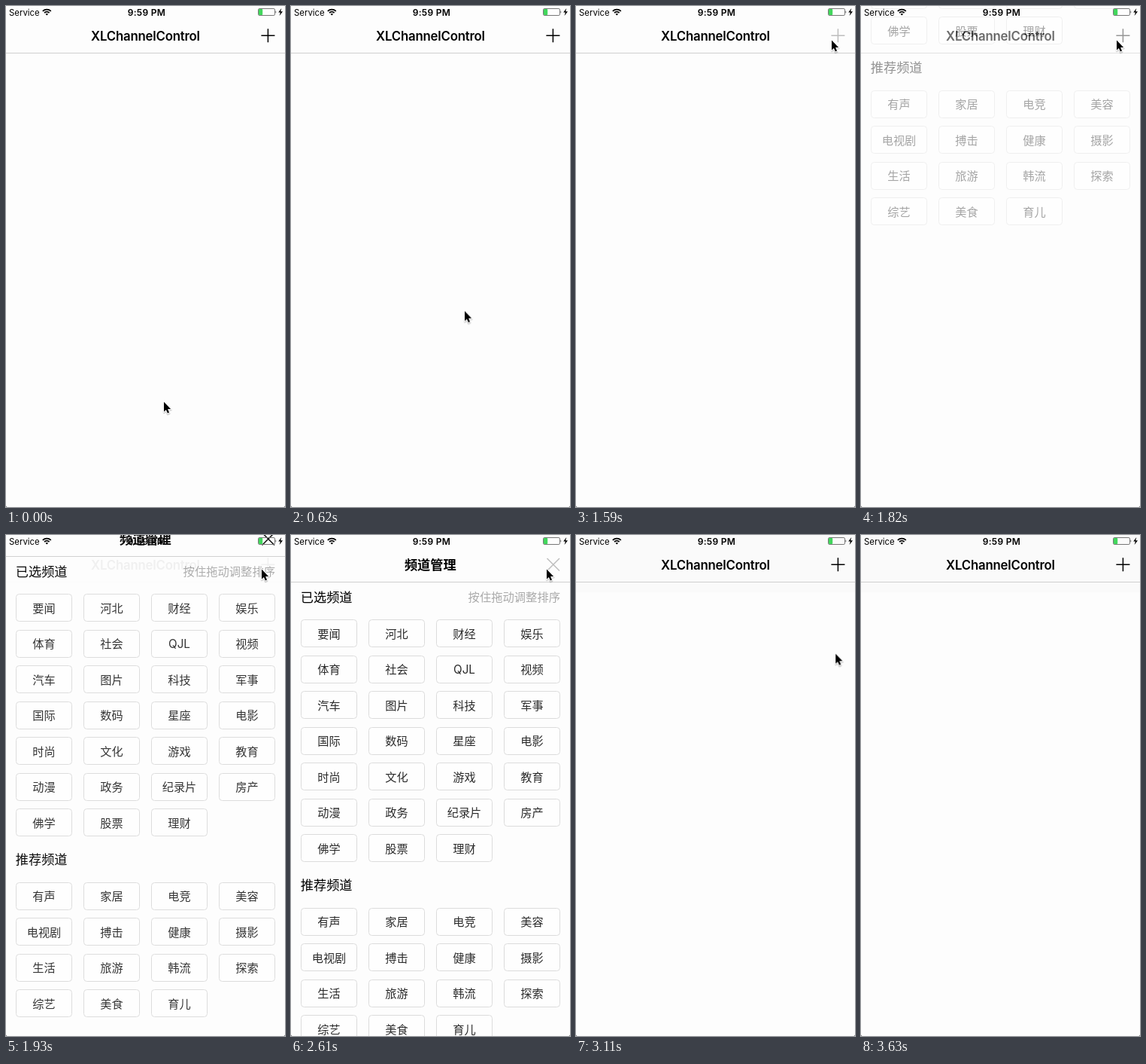
An HTML page that plays this animation: 371 by 665 pixels, repeating every 4680 ms.

```html
<!DOCTYPE html>
<html lang="zh-CN">
<head>
<meta charset="utf-8">
<title>Channel control</title>
<style>
  html, body { margin: 0; width: 100%; height: 100%; overflow: hidden; background: #fdfdfd; }
  svg { display: block; width: 100vw; height: 100vh; }
  text { font-family: Inter, "Noto Sans CJK SC", "Noto Sans CJK", sans-serif; }
  .title { font-size: 16.8px; font-weight: 600; text-anchor: middle; }
  .latin { letter-spacing: -.2px; }
  .zh { font-size: 17.2px; font-family: "Noto Sans CJK SC", "Noto Sans CJK", sans-serif; }
  .zh.title { font-weight: 700; }
  .hint { font-size: 15.3px; fill: #aaa; text-anchor: end; }
  .tag text { font-size: 15.2px; fill: #2b2b2b; text-anchor: middle; }
  .tag rect { fill: #fefefe; stroke: #dcdcdc; }
  .icon { fill: none; stroke: #000; stroke-width: 1.5; }
  .rule { stroke: #cfcfcf; }

  #sheet, #plus, #close, #tint, #cursor { animation: 4680ms linear infinite; }
  #sheet, #plus, #close, #tint { animation-timing-function: step-end; }
  #sheet { animation-name: sheet; }
  #plus { animation-name: plus; }
  #close { animation-name: close; }
  #tint { animation-name: tint; }
  #cursor { animation-name: cursor; }

  /* Fades in while dropping from the top, leaves opaque. */
  @keyframes sheet {
    0%, 62.6%, 100% { transform: translateY(-670px); opacity: 0; }
    36.53% { transform: translateY(-650px); opacity: .02; }
    37.6%  { transform: translateY(-559px); opacity: .16; }
    38.88% { transform: translateY(-383px); opacity: .42; }
    40.17% { transform: translateY(-160px); opacity: .76; }
    41.23% { transform: translateY(-34px); opacity: .95; }
    43.16% { transform: translateY(0); opacity: 1; }
    57.69% { transform: translateY(-93px); opacity: 1; }
    58.97% { transform: translateY(-262px); opacity: 1; }
    60.89% { transform: translateY(-565px); opacity: 1; }
  }
  @keyframes plus {
    0%, 40.17%, 100% { opacity: 1; }
    33.97% { opacity: .25; }
    36.53% { opacity: .35; }
    37.6%  { opacity: .5; }
    38.88% { opacity: .7; }
  }
  @keyframes close {
    0%, 62.6%, 100% { opacity: 1; }
    55.76% { opacity: .25; }
  }
  @keyframes tint {
    0% { opacity: 0; }
    62.6%, 100% { opacity: 1; }
  }
  @keyframes cursor {
    0% { transform: translate(210px, 526px); }
    11.53% { transform: translate(210px, 526px); animation-timing-function: steps(6, start); }
    16.41%, 18.58% { transform: translate(252px, 285px); animation-timing-function: steps(5, start); }
    23.12%, 23.29% { transform: translate(323px, 78px); animation-timing-function: steps(5, start); }
    27.28%, 66.45% { transform: translate(340px, 46px); animation-timing-function: steps(4, start); }
    71.3% { transform: translate(361px, 495px); animation-timing-function: step-end; }
    76.49% { transform: translate(365px, 498px); animation-timing-function: step-end; }
    77.56%, 100% { transform: translate(400px, 526px); animation-timing-function: step-end; }
  }
</style>
</head>
<body>
<svg viewBox="0 0 371 665">
  <rect width="371" height="665" fill="#fdfdfd"/>
  <rect id="tint" width="371" height="76" fill="#fafafa"/>
  <path class="rule" d="M0 62.5H371"/>
  <text class="title latin" x="185.4" y="46">XLChannelControl</text>
  <path id="plus" class="icon" d="M339.4 39.3H357.4M348.4 30.3V48.3"/>

  <g id="sheet">
    <rect width="371" height="665" fill="#fdfdfd"/>
    <path class="rule" d="M0 62.5H371"/>
    <text class="zh title" x="185.3" y="46.4">频道管理</text>
    <path id="close" class="icon" d="M340.5 31L357 47.5M357 31L340.5 47.5"/>
    <text class="zh" x="12.8" y="88.5">已选频道</text>
    <text class="zh hint" x="358" y="88">按住拖动调整排序</text>
    <text class="zh" x="12.8" y="471.2">推荐频道</text>
    <g id="tags"></g>
  </g>

  <g id="status">
    <text x="4" y="12.5" font-size="11.4">Service</text>
    <path d="M48.8 6.8A8 8 0 0 1 59.8 6.8M51 9A4.9 4.9 0 0 1 57.6 9" fill="none" stroke="#000" stroke-width="1.7"/>
    <path d="M54.3 12.6L52.5 10.8A2.6 2.6 0 0 1 56.1 10.8Z"/>
    <text x="187" y="12.5" font-size="12" font-weight="600" letter-spacing=".3" text-anchor="middle">9:59 PM</text>
    <rect x="335.5" y="3.5" width="22" height="9" rx="1.6" fill="none" stroke="#777"/>
    <rect x="336" y="4" width="5.2" height="8" rx="1" fill="#42d75c"/>
    <path d="M358.6 6.2Q360.2 8 358.6 9.8Z"/>
    <path d="M366.3 3L362.2 8.6H364.8L363.6 13L368 7.2H365.2Z"/>
  </g>

  <path d="M0 663.5V665H1.5ZM371 663.5V665H369.5Z" fill="#777"/>

  <g id="cursor">
    <path d="M0 1V14L3 11.2L5 16L7.2 15L5.2 10.2H9.4Z" fill="none" stroke="#000" stroke-width="2.6" stroke-linejoin="round" opacity=".16"/>
    <path d="M0 -.6V12.6L2.9 9.9L4.9 14.5L7 13.6L5.1 9H9.1Z" stroke="#fff" stroke-width="1.7" paint-order="stroke"/>
  </g>
</svg>
<script>
  const chosen = "要闻 河北 财经 娱乐 体育 社会 QJL 视频 汽车 图片 科技 军事 国际 数码 星座 电影 " +
    "时尚 文化 游戏 教育 动漫 政务 纪录片 房产 佛学 股票 理财";
  const suggested = "有声 家居 电竞 美容 电视剧 搏击 健康 摄影 生活 旅游 韩流 探索 综艺 美食 育儿";

  const tagGrid = (names, top) => names.split(" ").map((name, i) => {
    const x = 13.5 + (i % 4) * 90;
    const y = top + Math.floor(i / 4) * 47.55;
    // The last row is cut off by the sheet's lower edge.
    return `<g class="tag"><rect x="${x}" y="${Math.round(y) + .5}" width="74" height="36" rx="4"/>
      <text x="${x + 37}" y="${y + 24.6}">${name}</text></g>`;
  }).join("");

  const tags = document.getElementById("tags");
  tags.innerHTML = tagGrid(chosen, 112) + tagGrid(suggested, 494.5);
  tags.style.clipPath = "path('M0 0H371V665H0Z')";
</script>
</body>
</html>
```
